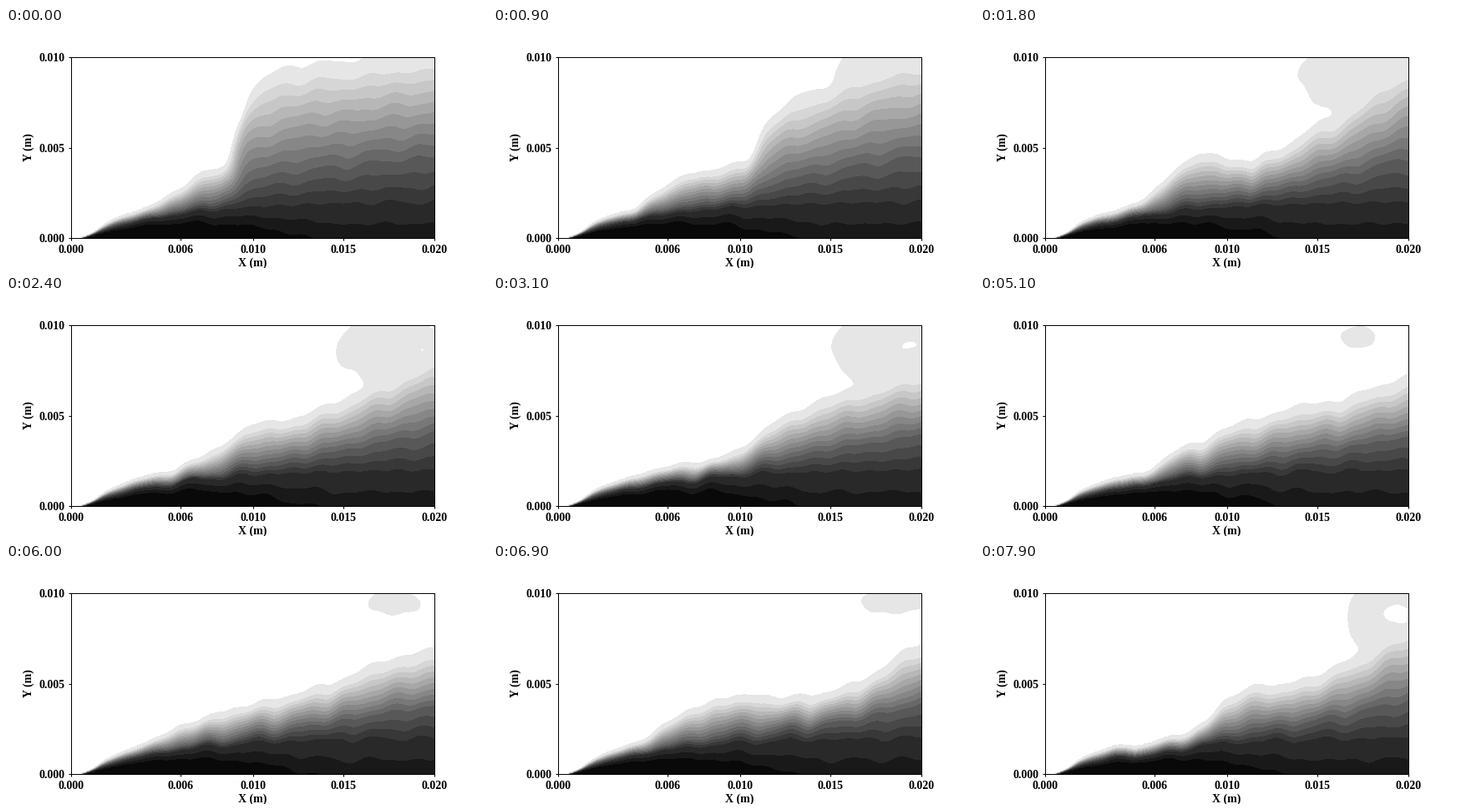
A matplotlib script for the animation above (8000 ms loop, 576 by 288 pixels).

```python
import numpy as np
import matplotlib.pyplot as plt
from matplotlib.animation import FuncAnimation

plt.rcParams.update({
    "font.family": "Liberation Serif",
    "font.weight": "bold",
    "font.size": 10,
    "axes.linewidth": 0.72,
})

W, H, DPI = 576, 288, 100
LEFT, RIGHT, TOP, BOTTOM = 78.1, 513.1, 35.1, 252.1
FRAMES, STEP = 80, 100
DRIFT = 45          # px per second, downstream

# Spray height over the base: the nozzle never moves, the plume does.
NOZZLE_X, NOZZLE = (90, 105, 120, 140, 165), (-1, 6, 18, 27, 35)
KNOTS = (190, 235, 265, 290, 330, 380, 430, 513)

# time, heights at KNOTS, faint cloud (x, y, rx, ry), half width of the gap in it
POSES = [
    (0.0, (47, 78, 87, 175, 205, 210, 215, 225), (500, 40, 50, 30), 0),
    (1.8, (40, 85, 101, 96, 92, 120, 150, 215), (455, 60, 77, 42), 0),
    (3.1, (42, 53, 54, 66, 95, 123, 140, 165), (468, 65, 65, 42), 7),
    (4.1, (46, 58, 67, 76, 76, 102, 127, 165), (468, 45, 46, 32), 13),
    (5.1, (37, 65, 78, 92, 104, 120, 126, 157), (453, 49, 24, 13), 0),
    (6.9, (47, 80, 85, 97, 92, 94, 106, 158), (478, 45, 40, 15), 0),
    (7.9, (33, 47, 55, 90, 105, 110, 130, 180), (480, 60, 45, 42), 17),
]

DENSE = np.arange(60, 600)
KERNEL = np.exp(-0.5 * (np.arange(-15, 16) / 5) ** 2)
KERNEL /= KERNEL.sum()


def outline(heights):
    h = np.interp(DENSE, NOZZLE_X + KNOTS, NOZZLE + heights)
    return np.convolve(np.pad(h, 15, mode="edge"), KERNEL, mode="valid")


OUTLINES = [outline(p[1]) for p in POSES]
TIMES = [p[0] for p in POSES]

X, Y = np.meshgrid(np.linspace(LEFT, RIGHT, 262), np.linspace(TOP, BOTTOM, 132))
XD = (X - LEFT) / (RIGHT - LEFT) * 0.02
YD = (BOTTOM - Y) / (BOTTOM - TOP) * 0.01
REACH = np.clip((X - 110) / 150, 0, 1)

rng = np.random.default_rng(4)
WAVES = [(2 * np.pi / rng.uniform(28, 75), rng.uniform(-0.08, 0.08),
          rng.uniform(0, 2 * np.pi)) for _ in range(5)]


def ripple(t, shift=0.0):
    """Slow wobble carried downstream."""
    xt = X - 60 * t
    return REACH * sum(np.sin(kx * xt + ky * Y + p + shift)
                       for kx, ky, p in WAVES) / 2


def ellipse(x, y, cx, cy, rx, ry):
    """Soft mask: 1 inside, 0 outside."""
    r2 = ((x - cx) / rx) ** 2 + ((y - cy) / ry) ** 2
    return 1 / (1 + r2 ** 4)


def layers(edge):
    """Heights of the density levels under the outer edge."""
    run = np.maximum(X - 95, 0)
    body = 0.9 * edge
    dark = np.minimum(10 + 0.09 * run + 0.25 * body, 0.75 * body)
    base = np.minimum(44 * (1 - np.exp(-run / 110)), 0.58 * edge)
    core = 18 * (1 - ((X - 225) / 138) ** 2)
    core = np.minimum(np.maximum(core, -9), 0.4 * edge)
    return (0, edge + 25), (1, edge), (2, body), (10, dark), (13, base), \
        (15, core), (16, core - 12)


def density(t):
    i = min(np.searchsorted(TIMES, t - 1e-9, side="right"), len(POSES) - 1)
    i = max(i, 1)
    (t0, _, cloud0, gap0), (t1, _, cloud1, gap1) = POSES[i - 1:i + 1]
    s = (t - t0) / (t1 - t0)

    x = X + 3 * ripple(t, 1.7)
    y = Y + 2 * ripple(t)
    edge = ((1 - s) * np.interp(x - DRIFT * (t - t0) * REACH, DENSE, OUTLINES[i - 1])
            + s * np.interp(x + DRIFT * (t1 - t) * REACH, DENSE, OUTLINES[i]))

    f = np.zeros_like(X)
    steps = layers(edge)
    depth, low = BOTTOM - y, steps[0][1]
    for (k0, _), (k1, h) in zip(steps, steps[1:]):
        high, low = low, np.minimum(h, low - 0.3)
        f += (k1 - k0) * np.clip((high - depth) / (high - low), 0, 1)

    cloud = (1 - s) * np.array(cloud0) + s * np.array(cloud1)
    f += ellipse(x, y, *cloud) * np.maximum(1.6 - f, 0)
    gap = (1 - s) * gap0 + s * gap1
    if gap > 1:
        f *= 1 - ellipse(x, y, 500, 60, gap, 0.6 * gap)
    return np.minimum(f, 15.99)


fig = plt.figure(figsize=(W / DPI, H / DPI), dpi=DPI, facecolor="white")
ax = fig.add_axes([LEFT / W, 1 - BOTTOM / H, (RIGHT - LEFT) / W, (BOTTOM - TOP) / H])
ax.set(xlim=(0, 0.02), ylim=(0, 0.01))
for set_ticks, ticks in ((ax.set_xticks, (0, 0.006, 0.010, 0.015, 0.020)),
                         (ax.set_yticks, (0, 0.005, 0.010))):
    set_ticks(ticks, [f"{v:.3f}" for v in ticks])
ax.tick_params(length=2.5, pad=3)
fig.text(295 / W, 1 - 286 / H, "X (m)", ha="center", va="baseline")
fig.text(27.5 / W, 1 - 143 / H, "Y (m)", ha="center", va="center", rotation=90)

LEVELS = np.arange(1, 17)
GREYS = [str((9 + 15.8 * (15 - k)) / 255) for k in LEVELS[:-1]]
shown = []


def draw(i):
    while shown:
        shown.pop().remove()
    f = density(i * STEP / 1000)
    shown.append(ax.contourf(XD, YD, f, levels=LEVELS, colors=GREYS))
    return shown


anim = FuncAnimation(fig, draw, frames=FRAMES, interval=STEP,
                     init_func=lambda: [], repeat=True, repeat_delay=0, blit=False)

plt.show()
```
